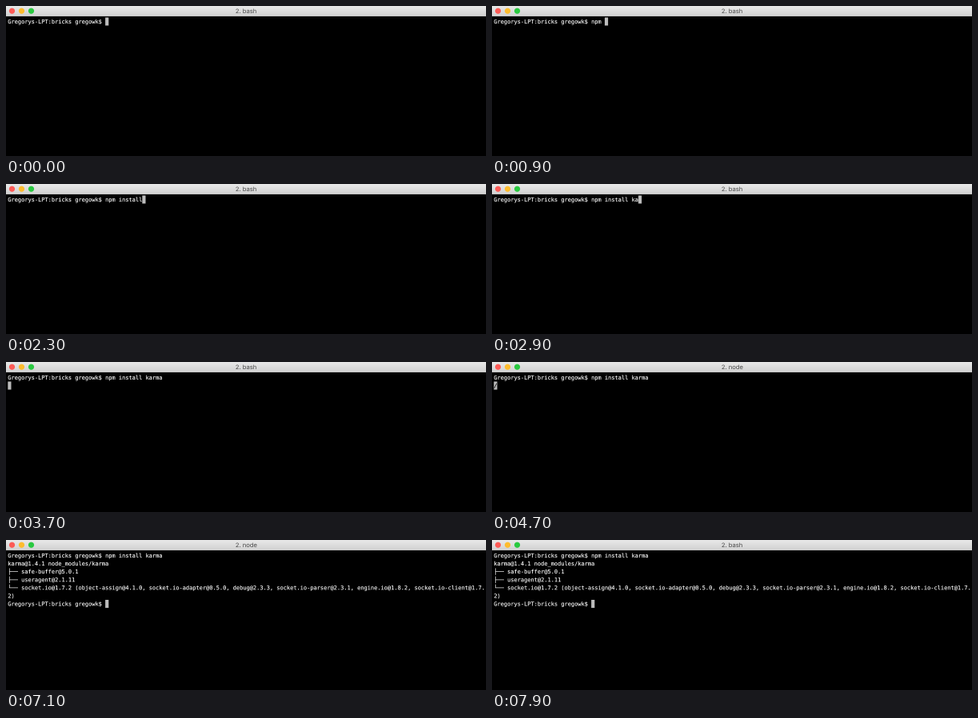
These frames come from a looping animation (600x188 px, 8000 ms). An HTML page with a canvas:

```html
<!DOCTYPE html>
<html lang="en">
<head>
<meta charset="utf-8">
<title>Terminal</title>
<style>
  html, body { margin: 0; width: 100%; height: 100%; overflow: hidden; background: #000; }
  canvas { display: block; width: 600px; height: 188px; }
</style>
</head>
<body>
<canvas id="stage" width="600" height="188"></canvas>
<script>
const W = 600, H = 188, LOOP = 8000, SCALE = 4;
const COLS = 142, CELL = 4.2, ROW = 10.1, LEFT = 2.3, TOP = 14.4;
const MONO = '6.977px "DejaVu Sans Mono", monospace';
const SANS = '7.6px Inter, sans-serif';
const TEXT = '#f4f4f4', CURSOR = '#bcbcbc';

const PROMPT = 'Gregorys-LPT:bricks gregowk$ ';
const COMMAND = 'npm install karma';
const OUTPUT = [
  'karma@1.4.1 node_modules/karma',
  '├── safe-buffer@5.0.1',
  '├── useragent@2.1.11',
  '└── socket.io@1.7.2 (object-assign@4.1.0, socket.io-adapter@0.5.0, ' +
  'debug@2.3.3, socket.io-parser@2.3.1, engine.io@1.8.2, socket.io-client@1.7.2)'
];

// [time in ms, number of typed characters]
const TYPING = [
  [0, 0], [500, 1], [700, 3], [900, 4], [1500, 5], [1700, 6], [1900, 8],
  [2100, 10], [2300, 11], [2500, 12], [2900, 14], [3100, 15], [3300, 17]
];
const ENTER = 3500, NODE = 4300, SPIN = 4700, DASH = 5700, DONE = 7100, BASH = 7900;

const stage = document.getElementById('stage').getContext('2d');
stage.imageSmoothingQuality = 'high';

// Draw large and shrink, so small type keeps its fractional spacing.
const buffer = document.createElement('canvas');
buffer.width = W * SCALE;
buffer.height = H * SCALE;
const ctx = buffer.getContext('2d');
ctx.scale(SCALE, SCALE);

function stateAt(t) {
  const typed = TYPING.filter(([at]) => at <= t).pop()[1];
  const lines = [PROMPT + COMMAND.slice(0, typed)];
  if (t >= DONE) {
    for (const line of OUTPUT) {
      for (let i = 0; i < line.length; i += COLS) lines.push(line.slice(i, i + COLS));
    }
    lines.push(PROMPT);
  } else if (t >= ENTER) {
    lines.push('');
  }
  const spinner = t < SPIN || t >= DONE ? '' : t < DASH ? '/' : '-';
  const title = t >= NODE && t < BASH ? '2. node' : '2. bash';
  return { lines, spinner, title };
}

function drawLine(text, col, row, color) {
  ctx.font = MONO;
  ctx.fillStyle = ctx.strokeStyle = color;
  ctx.lineWidth = 0.15;
  const y = TOP + row * ROW + 7.5;
  [...text].forEach((ch, i) => {
    const x = LEFT + (col + i) * CELL;
    ctx.fillText(ch, x, y);
    ctx.strokeText(ch, x, y);
  });
}

function drawBar(title) {
  const shade = ctx.createLinearGradient(0, 0, 0, 13);
  shade.addColorStop(0, '#e9e9e9');
  shade.addColorStop(1, '#d1d1d1');
  ctx.fillStyle = shade;
  ctx.fillRect(0, 0, W, 13);
  ctx.fillStyle = '#b4b4b4';
  ctx.fillRect(0, 12.5, W, 0.5);

  ['#fc5b57', '#fdbc2e', '#2ac940'].forEach((color, i) => {
    ctx.fillStyle = color;
    ctx.beginPath();
    ctx.arc(7.5 + i * 12, 6.2, 3.6, 0, Math.PI * 2);
    ctx.fill();
  });

  ctx.font = SANS;
  ctx.fillStyle = '#484848';
  ctx.fillText(title, 286.8, 9);
}

function draw({ lines, spinner, title }) {
  ctx.fillStyle = '#000';
  ctx.fillRect(0, 0, W, H);
  drawBar(title);
  lines.forEach((line, row) => drawLine(line, 0, row, TEXT));

  const row = lines.length - 1, col = lines[row].length;
  ctx.fillStyle = CURSOR;
  ctx.fillRect(LEFT + col * CELL, TOP + row * ROW, CELL, ROW);
  drawLine(spinner, col, row, '#000');

  stage.drawImage(buffer, 0, 0, W, H);
}

const start = performance.now();
let shown = '';

function tick() {
  const state = stateAt((performance.now() - start) % LOOP);
  const key = JSON.stringify(state);
  if (key !== shown) {
    draw(state);
    shown = key;
  }
  requestAnimationFrame(tick);
}
tick();
</script>
</body>
</html>
```
